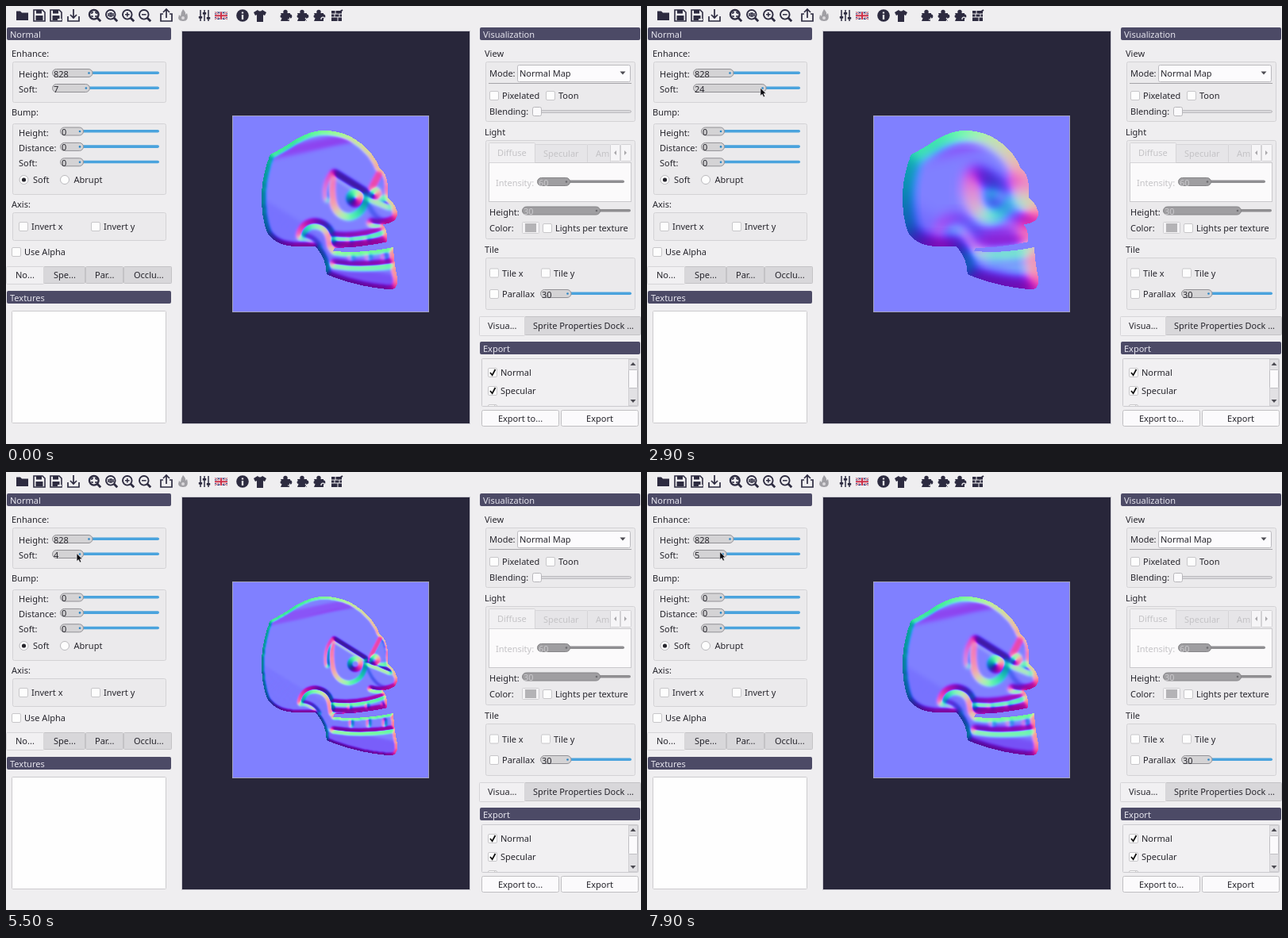
An HTML page with a canvas that plays this animation: 800 by 552 pixels, repeating every 8 s.

```html
<!DOCTYPE html>
<html lang="en">
<head>
<meta charset="utf-8">
<title>Normal map editor</title>
<style>
  html, body { margin: 0; width: 100%; height: 100%; overflow: hidden; background: #efeef0; }
  svg, canvas { position: absolute; left: 0; top: 0; display: block; }
  canvas { left: 285px; top: 138px; }
  text { font: 11px "Noto Sans", sans-serif; white-space: pre; }
</style>
</head>
<body>
<svg id="ui" width="800" height="552"></svg>
<canvas id="map" width="248" height="248"></canvas>
<svg id="top" width="800" height="552">
  <rect x="285.5" y="138.5" width="247" height="247" fill="none" stroke="#a3a2bd"/>
  <path id="cursor" d="M0 0V10L2.3 8 4 11.6 5.8 10.8 4.2 7.3H7.2Z" fill="#0c0b10" stroke="#fff" stroke-width=".6"/>
</svg>
<script>
const INK = '#26252c', DARK = '#2d2b40', LINE = '#d3d2d5', BLUE = '#4aa3dd', OFF = '#c4c3c6';
const $ = id => document.getElementById(id);

// ---- interface pieces ----
const rect = (x, y, w, h, fill, stroke, rx = 0) => stroke
  ? `<rect x="${x + .5}" y="${y + .5}" width="${w - 1}" height="${h - 1}" rx="${rx}" fill="${fill}" stroke="${stroke}"/>`
  : `<rect x="${x}" y="${y}" width="${w}" height="${h}" rx="${rx}" fill="${fill}"/>`;
const text = (x, mid, s, fill = INK, anchor = 'start') =>
  `<text x="${x}" y="${mid + 4}" fill="${fill}" text-anchor="${anchor}">${s}</text>`;
const path = (d, fill, stroke = 'none', w = 1) =>
  `<path d="${d}" fill="${fill}" stroke="${stroke}" stroke-width="${w}"/>`;
const circle = (x, y, r, fill, stroke = 'none', w = 1) =>
  `<circle cx="${x}" cy="${y}" r="${r}" fill="${fill}" stroke="${stroke}" stroke-width="${w}"/>`;
const group = (x, y, w, h) => rect(x, y, w, h, '#ebeaec', LINE, 2);
const bar = (x, y, w, s) => rect(x, y, w, 16, '#4c4a66', null, 2) + text(x + 4, y + 8.5, s, '#e6e5ee');
const check = (x, mid, s, on) => rect(x, mid - 6, 12, 12, '#fdfdfd', '#c8c7ca', 1.5)
  + (on ? path(`M${x + 3} ${mid}l2.6 3.2L${x + 9.5} ${mid - 4}`, 'none', '#111', 1.8) : '') + text(x + 16, mid, s);
const radio = (x, mid, s, on) => circle(x, mid, 5.5, '#fdfdfd', '#bab9bd')
  + (on ? circle(x, mid, 2.6, INK) : '') + text(x + 11.5, mid, s);

function slider(x, mid, right, end, value, off) {
  const tone = off ? ['#8f8e91', '#9f9ea1', '#858487', '#c9c8cb', '#6d6c70'] : [BLUE, '#d4d3d5', '#929195', INK, '#2d86c4'];
  return rect(x + 4, mid - 2.6, end - x - 4, 3.6, tone[0], null, 1.8)
    + rect(x, mid - 6, right - x, 11, tone[1], tone[2], 5)
    + circle(right - 5, mid - .5, 1.3, tone[4])
    + text(x + 2, mid + .5, value, tone[3]);
}
function tab(x, y, w, h, s, tx, active, fill = INK) {
  return rect(x, y, w, h, active ? '#f1f0f2' : '#d8d7da', active ? '#d6d5d8' : '#c4c3c6', 1) + text(tx, y + h / 2 - .5, s, fill);
}
const fadedTab = (x, y, w, h, s, tx) => rect(x, y, w, h, '#e6e5e8', '#d6d5d8', 1) + text(tx, y + h / 2 - .5, s, OFF);
const button = (x, y, w, h, s) => rect(x, y, w, h, '#fbfafc', '#c0bfc2', 2) + text(x + w / 2, y + h / 2, s, INK, 'middle');

// ---- toolbar, each icon around its centre ----
const icon = (x, body) => `<g transform="translate(${x} 12)">${body}</g>`;
const disk = path('M-7-7H4L7-4V7H-7Z', 'none', DARK, 1.6) + rect(-4, -7, 7, 4.5, DARK) + rect(-4.5, 0, 9, 6, DARK);
const lens = (mark, w = 1.9) => circle(-1.2, -1.2, 5.8, 'none', DARK, w) + path('M3 3L7.2 7.2', 'none', DARK, 2.8) + path(mark, 'none', DARK, 1.5);
const puzzle = mark => circle(-1, -4.6, 2.7, DARK) + circle(4.6, 1, 2.7, DARK) + circle(-5.5, 1, 2, DARK)
  + path('M-7-3H5V7H-7L-5 2Z', DARK) + path(mark, 'none', '#efeef0', 1.2);
function toolbar() {
  const flag = rect(-8, -4.5, 16, 9.5, '#343a78') + path('M-8-4.5L8 5M8-4.5L-8 5', 'none', '#eee', 2.2)
    + path('M-8-4.5L8 5M8-4.5L-8 5', 'none', '#c8324a', .8) + path('M0-4.5V5M-8 .2H8', 'none', '#f4f0f2', 3.6)
    + path('M0-4.5V5M-8 .2H8', 'none', '#cc2f48', 2);
  const knobs = path('M-5-7V7M0-7V7M5-7V7', 'none', DARK, 1.5) + rect(-7.2, 1, 4.4, 2.6, DARK) + rect(-2.2, -4, 4.4, 2.6, DARK) + rect(2.8, 2, 4.4, 2.6, DARK);
  const wall = rect(-7, -6, 13, 13, DARK) + path('M-7-2H6M-7 2H6M-2-6V-2M3-2V2M-3-2V2M1 2V7', 'none', '#efeef0', 1) + path('M1-3L7-7', 'none', DARK, 2);
  return [
    [20, path('M-7-5.5H-2L0-3.5H8V6H-7Z', DARK)],
    [42, disk], [63, disk + path('M2 5H7', 'none', '#efeef0', 2)],
    [85, path('M-7 1V7H7V1M0-8V2M-4-1L0 3 4-1', 'none', DARK, 1.7)],
    [112, lens('M-4-2V-4H-2M0-4H2V-2M2 0V1H0M-2 1H-4V0', 2.4)],
    [133, lens('M-4-3V1M-2-3H0V1H-2ZM2-3V1')], [154, lens('M-4-1.2H1.6M-1.2-4V1.6')], [175, lens('M-4-1.2H1.6')],
    [202, path('M-4-2H-7V7H7V-2H4M0 3V-7M-4-4L0-8 4-4', 'none', DARK, 1.7)],
    [223, path('M0-8Q4-4 3-1L5-3Q8 7 0 7T-5-1L-3 1Q-3-4 0-8Z', '#a09fa4') + circle(0, 3, 2, '#dad9dc')],
    [250, knobs], [271, flag],
    [298, circle(0, 0, 7.8, DARK) + path('M0-1V5M0-4.6V-2.4', 'none', '#efeef0', 2.3)],
    [320, path('M-3-7Q0-4 3-7L8-4 6 0 4-1V8H-4V-1L-6 0-8-4Z', DARK)],
    [353, puzzle('M2 5H7M4.5 2.5V7')], [374, puzzle('M3 3L7 7M7 3L3 7')], [395, puzzle('M2 5A2.5 2.5 0 1 1 5 7')], [417, wall]
  ].map(([x, body]) => icon(x, body)).join('');
}

function leftPanel() {
  return bar(1, 27, 207, 'Normal')
    + text(7, 60, 'Enhance:') + group(8, 70, 194, 52)
    + text(16, 85.5, 'Height:') + slider(58, 85, 109.5, 193, '828')
    + text(16, 104.5, 'Soft:') + '<g id="soft"></g>'
    + text(7, 134, 'Bump:') + group(8, 148, 194, 90)
    + ['Height:', 'Distance:', 'Soft:'].map((s, i) => text(16, 159.5 + i * 19.2, s) + slider(68, 158.5 + i * 19.4, 98, 193, '0')).join('')
    + radio(22.5, 219, 'Soft', true) + radio(74, 219, 'Abrupt')
    + text(7, 250, 'Axis:') + group(8, 260, 194, 36) + check(16, 278, 'Invert x') + check(107, 278, 'Invert y')
    + check(7, 310, 'Use Alpha')
    + tab(47, 328, 53, 22, 'Spe...', 60) + tab(100, 328, 48, 22, 'Par...', 112) + tab(148, 328, 61, 22, 'Occlu...', 161)
    + tab(0, 328, 48, 23, 'No...', 12, true)
    + bar(1, 359, 207, 'Textures') + rect(7, 384, 195, 142, '#fefefe', '#cccbce', 1);
}

function rightPanel() {
  const arrow = (x, y, d, fill = '#4c4b52') => path(`M${x} ${y}${d}Z`, fill);
  return bar(597, 27, 202, 'Visualization')
    + text(603, 60, 'View') + group(604, 70, 189, 76)
    + text(609, 84.5, 'Mode:') + rect(644, 74, 143, 22, '#fcfbfd', '#bbbabe', 2) + text(647, 84.5, 'Normal Map') + arrow(773.5, 82.5, 'h7l-3.5 4')
    + rect(608, 97, 180, 1, '#a5a4a8')
    + check(609, 113, 'Pixelated') + check(680, 113, 'Toon')
    + text(609, 133, 'Blending:') + rect(668, 131, 120, 4, '#d9d8db', '#bcbbbf', 2) + rect(663, 127, 12, 12, '#fbfafc', '#b7b6ba', 2)
    + text(603, 159, 'Light') + group(604, 169, 189, 125)
    + fadedTab(666, 174, 67, 24, 'Specular', 677) + fadedTab(732, 174, 30, 24, 'Am', 743)
    + rect(608, 197, 180, 50, '#fbfafb', '#cac9cc') + tab(608, 172, 59, 26, 'Diffuse', 619, true, OFF)
    + rect(761, 174, 13, 22, '#f6f5f7', LINE, 1) + rect(774, 174, 14, 22, '#f6f5f7', LINE, 1)
    + arrow(769, 182, 'v6l-3-3', '#a9a8ab') + arrow(779, 182, 'v6l3-3', '#a9a8ab')
    + text(617, 222.5, 'Intensity:', OFF) + slider(669, 222, 711, 779, '60', true)
    + text(609, 259.5, 'Height:') + slider(650, 258.5, 749, 787, '30', true)
    + text(609, 280, 'Color:') + rect(650, 272, 22, 15, '#f4f3f5', '#cfced1', 1) + rect(654, 274, 14, 11, '#b4b3b6') + check(676, 280, 'Lights per texture')
    + text(603, 307, 'Tile') + group(604, 317, 189, 66)
    + check(609, 336.5, 'Tile x') + check(674, 336.5, 'Tile y')
    + check(609, 363, 'Parallax') + slider(673, 363, 712.5, 788, '30')
    + tab(653, 391, 147, 24, 'Sprite Properties Dock ...', 664) + tab(596, 391, 58, 25, 'Visua...', 607, true)
    + bar(597, 423, 202, 'Export')
    + rect(599, 444, 198, 61, '#f1f0f2', '#cbcace', 1)
    + check(607, 462, 'Normal', true) + check(607, 485, 'Specular', true)
    + '<clipPath id="fold"><path d="M600 445H784V504H600Z"/></clipPath><g clip-path="url(#fold)">' + check(607, 508, 'Parallax', true) + '</g>'
    + rect(784, 445, 12, 59, '#e2e1e4', '#d0cfd2') + rect(784, 458, 12, 24, '#fbfafc', '#c0bfc3', 1)
    + arrow(786.5, 453, 'h7l-3.5-4') + arrow(786.5, 496, 'h7l-3.5 4')
    + button(599, 509, 98, 21, 'Export to...') + button(699, 509, 98, 21, 'Export');
}

$('ui').innerHTML = rect(0, 0, 800, 552, '#efeef0') + toolbar()
  + rect(221, 31, 364, 496, '#28263a', '#c9c8d0') + leftPanel() + rightPanel();

// ---- height field of the skull ----
const N = 248, ctx = $('map').getContext('2d');
function paintHeight() {
  const c = document.createElement('canvas');
  c.width = c.height = N;
  const g = c.getContext('2d');
  g.translate(-285, -138);
  const grey = v => `rgb(${v},${v},${v})`;
  const fill = (d, v) => { g.fillStyle = v.addColorStop ? v : grey(v); g.fill(new Path2D(d)); };
  const line = (d, w, v) => { g.strokeStyle = grey(v); g.lineWidth = w; g.stroke(new Path2D(d)); };
  const ramp = (x0, y0, x1, y1, a, b) => {
    const r = g.createLinearGradient(x0, y0, x1, y1);
    r.addColorStop(0, grey(a)); r.addColorStop(1, grey(b));
    return r;
  };
  const shape = 'M333 187Q350 179 362 170Q382 157 402 157Q428 158 447 173Q464 186 471 205Q480 211 481 226L481 241Q493 252 493 263Q492 273 474 275Q481 281 480 297Q450 304 414 305L412 309Q450 312 488 304Q489 325 493 343Q494 357 484 357Q445 355 404 338Q404 320 390 303L362 303Q335 300 328 283Q321 262 322 235Q324 208 333 187Z';
  g.lineCap = g.lineJoin = 'round';
  fill(shape, ramp(352, 260, 330, 296, 195, 165));
  g.save();
  g.clip(new Path2D(shape));
  fill('M328 190Q362 160 402 156Q430 158 442 170Q390 176 342 196Z', ramp(385, 170, 387.5, 182, 232, 195));
  fill('M404 325Q450 333 488 326L495 360L400 342Z', ramp(446, 330, 441, 354, 205, 150));
  fill('M413 211L453 236Q454 262 432 266Q413 264 411 241Q409 224 413 211Z', 95);
  fill('M457 238L474 208Q483 222 480 242Q470 246 457 238Z', 95);
  line('M413 211L453 236', 2.5, 40);
  line('M458 238L473 209', 2, 70);
  line('M412 212Q402 224 405 244', 2, 110);
  line('M371 291Q374 274 390 274Q406 276 409 291L411 304', 3, 45);
  line('M371 291Q386 291 394 304', 2, 110);
  fill('M453 240Q480 246 491 258Q495 271 480 272Q462 270 453 240Z', 215);
  line('M453 240Q468 245 484 252', 2, 80);
  line('M459 273Q474 278 490 270', 2.5, 50);
  line('M410 290Q445 295 479 281', 2.5, 50);
  line('M411 302Q446 304 481 296', 3, 40);
  line('M412 325Q450 331 488 324', 3, 50);
  for (const x of [433, 455, 475]) line(`M${x} 292V299M${x + 2} 312V320`, 1.5, 110);
  g.restore();
  g.fillStyle = grey(225);
  for (const [x, y, r] of [[440, 242, 7], [464, 237, 5]]) { g.beginPath(); g.arc(x, y, r, 0, 7); g.fill(); }
  const px = g.getImageData(0, 0, N, N).data;
  return {
    base: Float32Array.from({ length: N * N }, (_, i) => px[i * 4 + 3] > 127 ? px[i * 4] / 255 : 0),
    solid: Uint8Array.from({ length: N * N }, (_, i) => px[i * 4 + 3] > 127)
  };
}
const { base, solid } = paintHeight();

// One Gaussian pass along rows, written transposed.
function blurRows(src, kernel) {
  const out = new Float32Array(N * N), r = kernel.length - 1;
  for (let y = 0; y < N; y++) for (let x = 0; x < N; x++) {
    const lo = Math.max(0, x - r), hi = Math.min(N - 1, x + r);
    let sum = 0;
    for (let i = lo; i <= hi; i++) sum += src[y * N + i] * kernel[Math.abs(i - x)];
    out[x * N + y] = sum;
  }
  return out;
}
function shade(soft) {
  const sigma = .4 * soft, r = Math.ceil(sigma * 2.6);
  const kernel = Array.from({ length: r + 1 }, (_, i) => Math.exp(-i * i / (2 * sigma * sigma)));
  const total = 2 * kernel.reduce((a, b) => a + b) - kernel[0];
  const unit = kernel.map(k => k / total);
  const h = blurRows(blurRows(base, unit), unit);
  // Small radii only pick up fine detail, so their relief is shallower.
  const depth = 33 * Math.min(1, soft / 14 + .2);
  const img = ctx.createImageData(N, N);
  for (let i = 0; i < N * N; i++) {
    const k = solid[i] ? depth : 0;
    const dx = k * (h[i + 1] - h[i - 1]) || 0, dy = k * (h[i + N] - h[i - N]) || 0;
    const len = Math.hypot(dx, dy, 1);
    img.data.set([128 - 127 * dx / len, 128 + 127 * dy / len, 128 + 127 / len, 255], i * 4);
  }
  return img;
}
const maps = {};

// ---- motion ----
function track(keys, t, col = 1) {
  let i = 0;
  while (i < keys.length - 2 && t >= keys[i + 1][0]) i++;
  const a = keys[i], b = keys[i + 1], p = Math.min(1, Math.max(0, (t - a[0]) / (b[0] - a[0])));
  return a[col] + (b[col] - a[col]) * p;
}
const SOFT = [[0, 7], [2200, 7], [2900, 24], [3500, 38], [3700, 36], [4300, 14], [4600, 8], [5100, 3],
  [5500, 4], [5800, 8], [6500, 38], [6800, 39], [7100, 34], [7800, 7], [7900, 5]];
const ENTER = [[600, 330, 500], [1100, 215, 180], [1300, 200, 165], [1900, 100, 102], [2100, 100, 102], [2200, 97, 102]];
const GRIP = [[2200, 102], [3700, 104.5], [4600, 104.5], [5500, 102.5], [6800, 102], [7900, 100.5]];
const softAt = t => Math.round(track(SOFT, t));

let shown;
function render(time) {
  const t = Math.floor(time % 8000 / 100) * 100;
  const soft = softAt(t), lagged = softAt(Math.max(0, t - 100));
  $('soft').innerHTML = slider(58, 104, 87.5 + 2.63 * soft, 193, soft);
  if (lagged !== shown) ctx.putImageData(maps[lagged] ??= shade(lagged), 0, 0);
  shown = lagged;
  const drag = t >= 2200;
  const x = drag ? 78.3 + 2.69 * soft : track(ENTER, t), y = drag ? track(GRIP, t) : track(ENTER, t, 2);
  $('cursor').setAttribute('transform', `translate(${x} ${y})`);
  $('cursor').setAttribute('visibility', t < 600 ? 'hidden' : 'visible');
}
const start = performance.now();
(function loop() {
  render(performance.now() - start);
  requestAnimationFrame(loop);
})();
</script>
</body>
</html>
```
